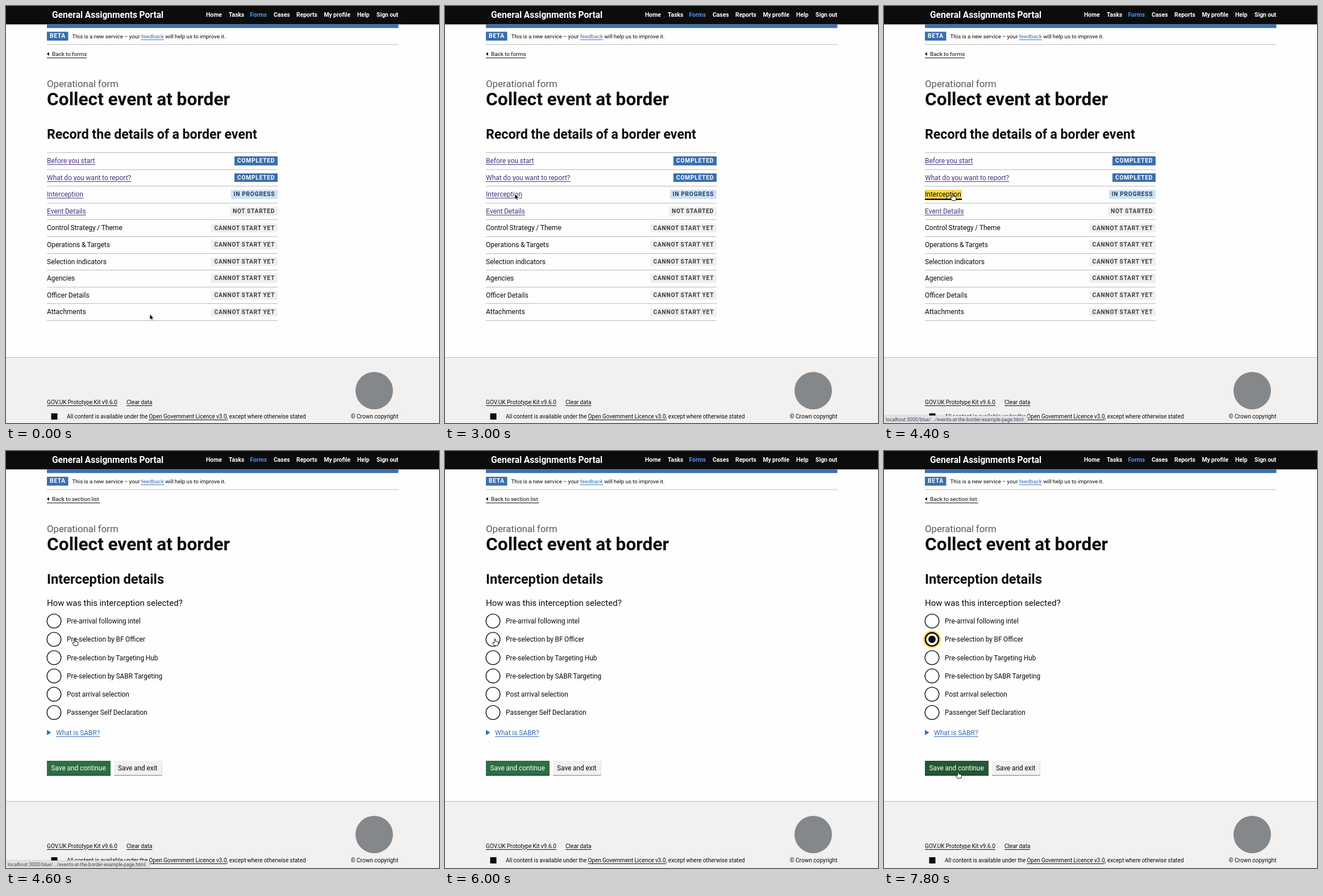
Write an HTML page that moves like this. It is 762x735 px and loops after 8000 ms.

```html
<!DOCTYPE html>
<html lang="en">
<head>
<meta charset="utf-8">
<title>Border event form</title>
<style>
html, body { margin: 0; width: 762px; height: 735px; overflow: hidden; background: #fefefe; }
body { position: relative; color: #0c0c0c; font-family: Roboto, "Liberation Sans", sans-serif; word-spacing: -.02em; }
p, svg, div { position: absolute; margin: 0; white-space: pre; }
div { left: 0; top: 0; width: 762px; height: 735px; }
p { line-height: 0; }
u { text-decoration-thickness: 1px; text-underline-offset: 1.5px; }
svg { left: 0; top: 0; overflow: visible; }
.bold { font-weight: bold; }
.white { color: #fff; }
.blue { color: #3a6fb0; }
.nav { color: #4c92f0; }
.visited { color: #49307f; }
.grey { color: #55595e; }
.caps { font-weight: bold; letter-spacing: .7px; }
.tag { height: 15.6px; line-height: 15.6px; padding: 0 4.3px 0 5px; }
.done { background: #3a6fb0; color: #fff; }
.progress { background: #d0e1f2; color: #1d4068; }
.idle { background: #eeefef; color: #3d4145; }
#status { left: 0; top: 722px; width: 253px; height: 13px; background: #dfe1e5; border-radius: 0 3px 0 0; box-shadow: 0 0 2px #999; color: #45484c; }
</style>
</head>
<body>
<script>
// y is the vertical centre of the capitals
const text = (x, y, size, html, cls = '') =>
  `<p class="${cls}" style="left:${x}px;top:${y}px;font-size:${size}px">${html}</p>`;
const svg = inner => `<svg width="762" height="735">${inner}</svg>`;
const box = (x, y, w, h, fill, id = '') =>
  svg(`<rect id="${id}" x="${x}" y="${y}" width="${w}" height="${h}" fill="${fill}"/>`);
const rule = (y, w) => box(72, y, w, 1, '#b9bbbd');
const tag = (y, label, cls) =>
  `<p class="caps tag ${cls}" style="right:284.5px;top:${y - 7.8}px;font-size:10.3px">${label}</p>`;
const link = s => `<u>${s}</u>`;
const back = (label, w) => text(81, 84.5, 9.95, label) + box(72, 91, w, 1, '#0c0c0c');

const menu = [[352, 'Home'], [392, 'Tasks'], [429.5, 'Forms'], [471, 'Cases'], [511, 'Reports'],
  [559.5, 'My profile'], [618, 'Help'], [652, 'Sign out']];

const header = box(0, 0, 762, 32.4, '#0c0c0c') + box(72, 32.4, 618.5, 6.4, '#3a6fb0') +
  text(81, 16, 15.6, 'General Assignments Portal', 'bold white') +
  menu.map(([x, s]) => text(x, 16, 10.4, s, s == 'Forms' ? 'bold nav' : 'bold white')).join('') +
  box(72, 45.4, 37.5, 15.6, '#3a6fb0') +
  text(77, 53.3, 10.3, 'BETA', 'caps white') +
  text(116.5, 53.5, 9.85, 'This is a new service – your <u class="blue">feedback</u> will help us to improve it.') +
  rule(67.5, 618.5) +
  svg('<path d="M72 84.5l3.7-3.3v6.6z"/>') +
  text(72, 137, 16.8, 'Operational form', 'grey') +
  text(72, 165, 31.7, 'Collect event at border', 'bold');

const tasks = ['Before you start', 'What do you want to report?', 'Interception', 'Event Details',
  'Control Strategy / Theme', 'Operations &amp; Targets', 'Selection indicators', 'Agencies',
  'Officer Details', 'Attachments'];
const states = [['COMPLETED', 'done'], ['COMPLETED', 'done'], ['IN PROGRESS', 'progress'], ['NOT STARTED', 'idle']];
const step = 29.61;

const listPage = back('Back to forms', 70) +
  text(72, 226, 23.2, 'Record the details of a border event', 'bold') +
  rule(258, 406) +
  tasks.map((s, i) => {
    const y = 273 + step * i;
    return text(72, y, 12, i < 4 ? link(s) : s, i < 4 ? 'visited' : '') +
      tag(y, ...(states[i] || ['CANNOT START YET', 'idle'])) +
      rule(258 + Math.round(step * (i + 1)), 406);
  }).join('') +
  '<div id="focus">' + box(72, 324, 65, 16, '#fadb45') + box(72, 339.5, 65, 2.5, '#0c0c0c') +
  text(72, 273 + step * 2, 12, 'Interception') + '</div>';

const choices = ['Pre-arrival following intel', 'Pre-selection by BF Officer', 'Pre-selection by Targeting Hub',
  'Pre-selection by SABR Targeting', 'Post arrival selection', 'Passenger Self Declaration'];
const choiceY = i => 299.7 + 32.25 * i;

const formPage = back('Back to section list', 93.5) +
  text(72, 226, 23.7, 'Interception details', 'bold') +
  text(72, 267.5, 15, 'How was this interception selected?') +
  svg(choices.map((s, i) => `<circle cx="84.5" cy="${choiceY(i)}" r="12.3" fill="none" stroke="#0c0c0c" stroke-width="1.4"/>`).join('') +
    `<g id="picked" transform="translate(84.5 ${choiceY(1)})"><circle r="15.4" fill="#fadb45"/>` +
    '<circle r="11.6" fill="#fefefe" stroke="#0c0c0c" stroke-width="2.6"/><circle r="6.5" fill="#0c0c0c"/></g>' +
    '<path d="M72 491.5l7.5 4.7-7.5 4.7z" fill="#3a6fb0"/>') +
  choices.map((s, i) => text(107, choiceY(i) + .5, 11.9, s)).join('') +
  text(88, 496.5, 12, link('What is SABR?'), 'blue') +
  box(72, 546, 112, 26.3, '#0c2d1a') + box(72, 546, 112, 25, '#2c6e45', 'save') +
  box(190, 546, 84.5, 26.3, '#929191') + box(190, 546, 84.5, 25, '#f2f1f0') +
  text(79.5, 559, 11.9, 'Save and continue', 'white') +
  text(197, 559, 11.9, 'Save and exit');

const footer = box(0, 619, 762, 120, '#f2f1f0') + box(0, 619, 762, 1, '#b9bbbd') +
  svg('<circle cx="648" cy="678" r="33" fill="#85888b"/>') +
  box(79.5, 718, 11, 11, '#0c0c0c') +
  text(72, 698.5, 10.1, link('GOV.UK Prototype Kit v9.6.0')) +
  text(212, 698.5, 10.1, link('Clear data')) +
  text(107, 724, 10, 'All content is available under the <u>Open Government Licence v3.0</u>, except where otherwise stated') +
  '<p style="right:71.5px;top:724px;font-size:10.2px">© Crown copyright</p>';

document.body.innerHTML = header + `<div id="list">${listPage}</div><div id="form">${formPage}</div>` +
  `<div id="footer">${footer}</div>` +
  '<div id="status">' + text(3, 6.5, 8.6, 'localhost:3000/blue/.../events-at-the-border-example-page.html') + '</div>' +
  svg('<g id="cursor" stroke="#fff" stroke-linejoin="round">' +
    '<path id="arrow" d="M0 0V10L2.3 8 3.8 11.4 5.5 10.7 4 7.4H7Z" stroke-width=".8"/>' +
    '<path id="hand" d="M-1 7V1Q-1 0 0 0T1 1V4.5Q2.2 4 2.8 4.8 4 4.4 4.4 5.2 5.8 5 5.8 6.4V8.5Q5.8 10 4.8 12H-1L-4 8Q-4.4 6.4-2.8 6.6Z" fill="#fff" stroke="#0c0c0c"/></g>');

// time, x, y of the pointer tip
const path = [[0, 253, 543], [1000, 253, 543], [1800, 140, 351], [2200, 122, 331], [3000, 123, 331],
  [3600, 121, 331], [4800, 121, 331], [5600, 88, 331], [6800, 88, 331], [7600, 130, 562], [7800, 130.5, 565], [8000, 130.5, 565]];

function pointer(t) {
  const i = path.findIndex(k => k[0] > t);
  const [t0, x0, y0] = path[i - 1], [t1, x1, y1] = path[i];
  const k = (t - t0) / (t1 - t0), e = k * k * (3 - 2 * k);
  return [x0 + (x1 - x0) * e, y0 + (y1 - y0) * e];
}

const el = id => document.getElementById(id);
const show = (id, on) => { el(id).style.display = on ? '' : 'none'; };

function draw(now) {
  const t = Math.floor(now % 8000 / 200) * 200;
  const [x, y] = pointer(t), onForm = t >= 4600, hand = t >= 3600;
  show('list', !onForm);
  show('form', onForm);
  show('focus', t >= 4200);
  show('picked', t >= 6600);
  show('status', t >= 3600 && t < 5000);
  show('arrow', !hand);
  show('hand', hand);
  el('footer').style.top = onForm ? '-2px' : '0';
  el('save').style.fill = onForm && y > 546 ? '#255632' : '#2c6e45';
  el('cursor').setAttribute('transform', `translate(${x} ${y})`);
}

const start = performance.now();
(function tick() {
  draw(performance.now() - start);
  requestAnimationFrame(tick);
})();
</script>
</body>
</html>
```
